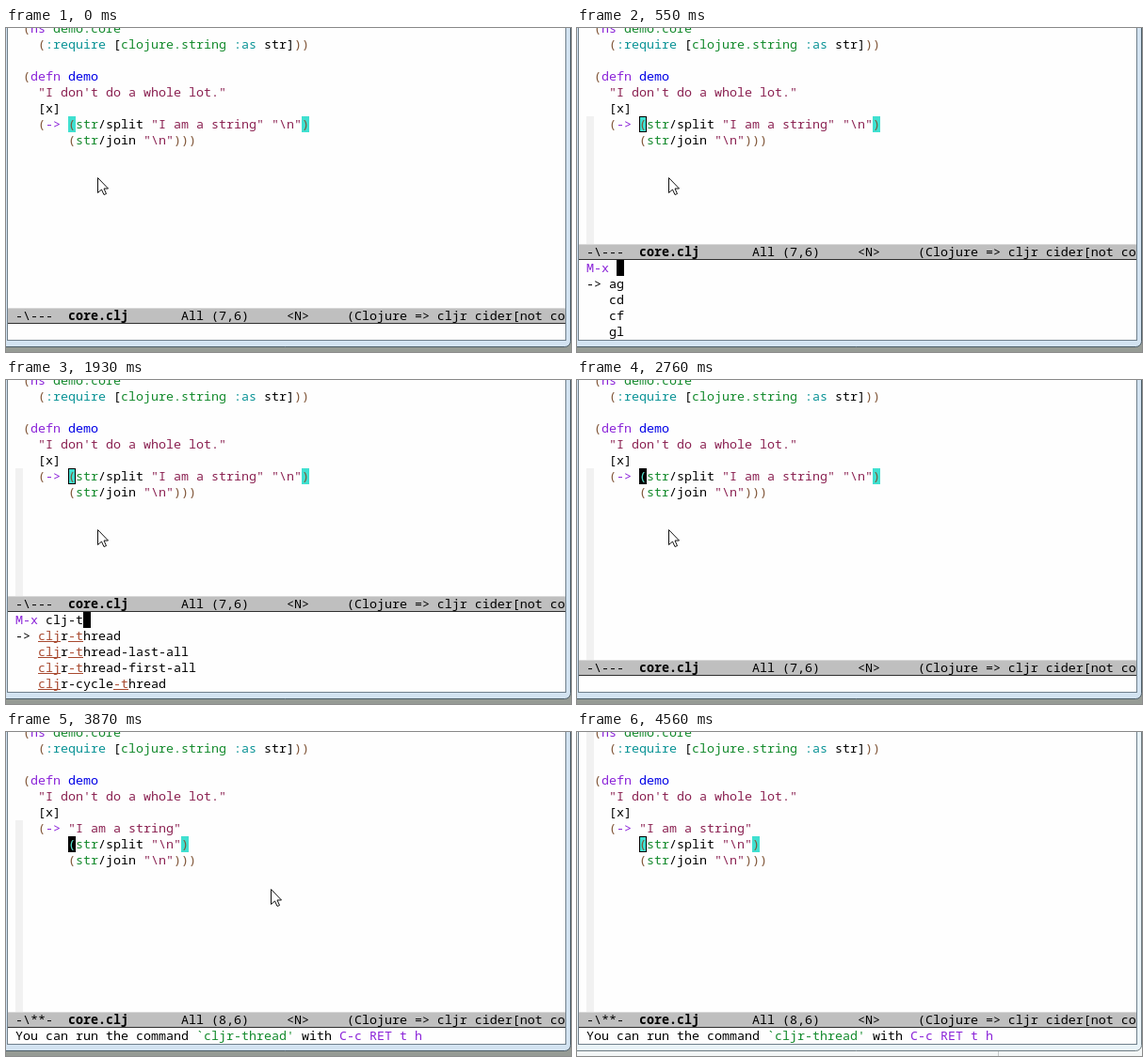
An HTML page with a canvas for the animation above (4650 ms loop, 600x345 px).

```html
<!DOCTYPE html>
<html lang="en">
<head>
<meta charset="utf-8">
<title>Editor demo</title>
<style>
html, body { margin: 0; width: 600px; height: 345px; overflow: hidden; }
canvas { display: block; }
</style>
</head>
<body>
<canvas id="stage" width="600" height="345"></canvas>
<script>
const ctx = document.getElementById('stage').getContext('2d');
const LOOP = 4650, CELL = 8, ROW = 17;
const FONT = '13.333px "Noto Sans Mono", "DejaVu Sans Mono", monospace';
const TEAL = '#40e0d0';

// "~x" in a marked string switches to colour x
const COLORS = {
  k: '#000', b: '#7f5436', p: '#8a22d8', f: '#0000e6', g: '#138a2c',
  t: '#0a9396', s: '#8b2252', m: '#a8492f', c: TEAL, B: '#000'
};

const HEAD = ['~b(~pns ~gdemo.core', '  ~b(~t:require ~k[~gclojure.string ~t:as ~kstr]~b))', '',
  '~b(~pdefn ~fdemo', '  ~s"I don\'t do a whole lot."', '  ~k[x]'];
const JOIN = '      ~b(~gstr~k/join ~s"\\n"~b)))';
const BEFORE = [...HEAD, '  ~b(~p-> ~b(~gstr~k/split ~s"I am a string" "\\n"~b)', JOIN];
const AFTER = [...HEAD, '  ~b(~p-> ~s"I am a string"', '      ~b(~gstr~k/split ~s"\\n"~b)', JOIN];
const MESSAGE = '~kYou can run the command ~g`cljr-thread\'~k with ~pC-c RET t h';

const PLAIN = ['ag', 'cd', 'cf', 'gl'];
const CLJR = ['cljr-slash', 'cljr-thread', 'cljr-unwind', 'cljr-version'];
const DASH = ['cljr-slash', 'cljr-thread', 'cljr-unwind', 'cljr-add-declaration'];
const THREAD = ['cljr-thread', 'cljr-thread-last-all', 'cljr-thread-first-all', 'cljr-cycle-thread'];

// start time, typed query, candidates
const PROMPTS = [[550, '', PLAIN], [1260, 'cl', CLJR], [1380, 'clj', CLJR],
  [1660, 'clj-', DASH], [1930, 'clj-t', THREAD], [2080, 'clj-th', THREAD]];
const POINTER = [[0, 97, 159], [3870, 281, 167], [4000, 440, 236], [4120, 557, 297], [4270]];
const CURSOR = [[0, 'off'], [430, 'solid'], [550, 'hollow'], [2760, 'solid'], [3440, 'off'],
  [3870, 'solid'], [4420, 'off'], [4560, 'hollow']];

const at = (steps, t) => steps.filter(s => s[0] <= t).pop();
const within = (t, a, b) => t >= a && t < b;

function rect(color, x, y, w, h) {
  ctx.fillStyle = color;
  ctx.fillRect(x, y, w, h);
}

function text(x, y, marked) {
  for (const part of ('~k' + marked).split('~').slice(1)) {
    const key = part[0], run = part.slice(1), width = run.length * CELL;
    ctx.font = (key === 'B' ? 'bold ' : '') + FONT;
    ctx.fillStyle = COLORS[key];
    ctx.fillText(run, x, y + 13);
    if (key === 'm') ctx.fillRect(x, y + 14, width, 1);
    x += width;
  }
}

function frame(final) {
  rect(final ? '#f3f6f6' : '#969b95', 0, 0, 600, 345);
  if (final) rect('#c4c8c8', 447, 340, 1, 5);
  ctx.beginPath();
  ctx.roundRect(-10, -10, 609.5, 349.5, 6);
  ctx.fillStyle = final ? '#e9f3f8' : '#d3e3f1';
  ctx.fill();
  ctx.strokeStyle = final ? '#6f7c82' : '#4c5d68';
  ctx.lineWidth = 1;
  ctx.stroke();
  rect('#6f7f8b', 1, 0, 594, 333);
  rect('#fefefe', 2, 0, 592, 332);
}

function cursor(x, y, style) {
  rect(style === 'solid' ? '#000' : TEAL, x, y, CELL, ROW);
  if (style === 'hollow') {
    ctx.strokeStyle = '#000';
    ctx.strokeRect(x + .5, y + .5, CELL - 1, ROW - 1);
  }
}

function code(lines, row, close, style) {
  const y = row * ROW - 8;
  rect(TEAL, close, y, CELL, ROW);
  cursor(66, y, style);
  lines.forEach((line, i) => text(18, i * ROW - 8, line));
  if (style === 'solid') text(66, y, '~c(');
}

function modeline(y, changed) {
  rect('#bfbfbf', 2, y, 592, ROW);
  rect('#d8d8d8', 2, y, 592, 1);
  rect('#303030', 2, y + ROW - 1, 592, 1);
  const state = changed ? '-\\**-' : '-\\---';
  text(10, y, `${state}  ~Bcore.clj~k       All (${changed ? 8 : 7},6)     <N>     (Clojure => cljr cider[not connected`);
}

// Underline the leading letters and the last place the rest of the query fits
function highlight(item, query) {
  const head = query.slice(0, 3), rest = query.slice(3), n = head.length;
  if (!rest) return `~m${head}~k${item.slice(n)}`;
  const i = item.lastIndexOf(rest);
  return `~m${head}~k${item.slice(n, i)}~m${rest}~k${item.slice(i + rest.length)}`;
}

function prompt(t) {
  const [, query, items] = at(PROMPTS, t);
  text(10, 247, '~pM-x ~k' + query);
  const blink = within(t, 1120, 1260) || t >= 2480;
  if (!blink) rect('#000', 42 + query.length * CELL, 247, CELL, ROW);
  items.forEach((item, i) =>
    text(10, 264 + i * ROW, (i ? '   ' : '-> ') + highlight(item, query)));
}

function pointer(x, y) {
  ctx.beginPath();
  for (const [dx, dy] of [[0, 0], [0, 16], [4, 12.5], [6.5, 18], [9, 17], [6.5, 11.5], [11, 11.5]])
    ctx.lineTo(x + dx + .5, y + dy + .5);
  ctx.closePath();
  ctx.fillStyle = '#fff';
  ctx.fill();
  ctx.strokeStyle = '#111';
  ctx.stroke();
}

function draw(t) {
  const asking = within(t, 550, 2760), done = t >= 2890, final = t >= 4560;
  const barY = asking ? 230 : 298, fringeY = final ? 0 : 94;
  const style = at(CURSOR, t)[1];

  frame(final);
  if (t >= 550) rect('#f1f1f1', 10, fringeY, 8, barY - fringeY);
  ctx.save();
  ctx.beginPath();
  ctx.rect(2, 0, 592, 332);
  ctx.clip();
  if (done) code(AFTER, 7, 186, style);
  else code(BEFORE, 6, 314, style);
  modeline(barY, done);
  if (asking) prompt(t);
  if (done) text(10, 315, MESSAGE);
  ctx.restore();

  const [, x, y] = at(POINTER, t);
  if (x) pointer(x, y);
}

const start = performance.now();
function tick() {
  draw((performance.now() - start) % LOOP);
  requestAnimationFrame(tick);
}
tick();
</script>
</body>
</html>
```
